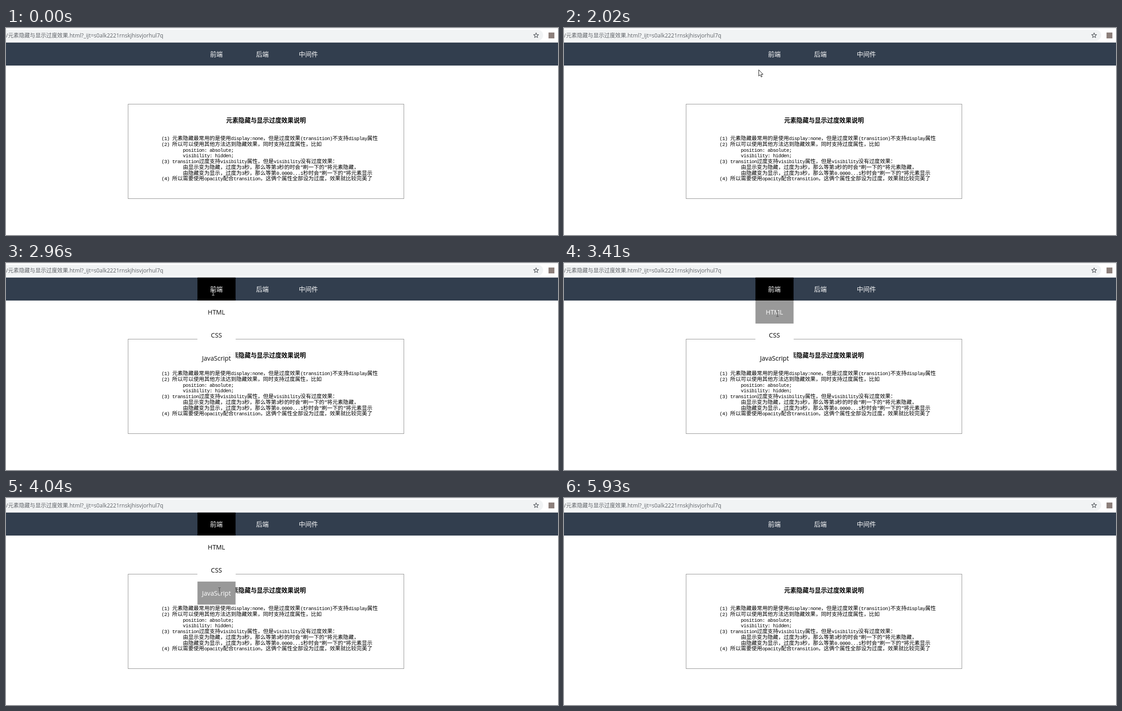
An HTML page for the animation above (6.86 s loop, 1223 by 458 pixels).

```html
<!DOCTYPE html>
<html lang="zh-CN">
<head>
<meta charset="utf-8">
<title>元素隐藏与显示过度效果</title>
<style>
  html, body { margin: 0; width: 100%; height: 100%; overflow: hidden; background: #fff; }
  svg { display: block; width: 1223px; height: 458px; }
  text { font: 14.1px "Open Sans", "Noto Sans CJK SC", "Noto Sans CJK", sans-serif; white-space: pre; }
  .mid, .mid text { text-anchor: middle; }
  #notes text { font: 11px "Liberation Mono", "Noto Sans CJK SC", "Noto Sans CJK", monospace; letter-spacing: -.68px; }
  #notes .zh { font: 11.84px "Noto Sans CJK SC", "Noto Sans CJK", sans-serif; letter-spacing: 0; }
</style>
</head>
<body>
<svg viewBox="0 0 1223 458">
  <rect width="1223" height="1" fill="#e4e6e9"/>
  <rect x="-20" y="4" width="1210" height="24" rx="12" fill="#f1f3f4"/>
  <text x="0" y="20.5" fill="#5f6368" style="font-size:12.1px">/元素隐藏与显示过度效果.html?_ijt=s0alk2221rnskjhisvjorhul7q</text>
  <path id="star" fill="none" stroke="#5f6368" stroke-width="1.3" stroke-linejoin="round"/>
  <rect x="1202" y="10" width="13" height="13" fill="#8d807b"/>

  <rect y="32.2" width="1223" height="50.9" fill="#323e4e"/>
  <rect id="tab" x="424.2" y="32.2" width="84.4" height="50.9"/>
  <g id="nav" class="mid" fill="#fff"></g>

  <rect x="270.5" y="168.5" width="611" height="209" fill="none" stroke="#909090"/>
  <text class="mid" x="576" y="208.5" style="font-size:13.6px;font-weight:700">元素隐藏与显示过度效果说明</text>
  <g id="notes"></g>

  <rect id="seam" x="424.2" y="168" width="84.4" height="1" fill="#fff"/>
  <g id="menu" class="mid"></g>

  <path id="arrow" d="M.5.5V14.3L3.6 11.4 5.9 16.4 8 15.4 5.8 10.6H10Z" fill="#fff" stroke="#111"/>
  <path id="beam" d="M-2.5-5.5H-.7L0-4.8.7-5.5H2.5M0-4.8V4.8M-2.5 5.5H-.7L0 4.8.7 5.5H2.5" fill="none"/>
</svg>
<script>
const LOOP = 6860, START = 440, BEAT = 5490 / 35;
const NAV_Y = 32.2, ROW = 50.9;
const OPEN = 11, TYPE = 12, CLOSE = 25, GONE = 35;
const $ = id => document.getElementById(id);

function add(parent, tag, attrs, text = "") {
  const el = document.createElementNS("http://www.w3.org/2000/svg", tag);
  for (const k in attrs) el.setAttribute(k, attrs[k]);
  el.textContent = text;
  parent.append(el);
  return el;
}

["前端", "后端", "中间件"].forEach((name, i) =>
  add($("nav"), "text", { x: 466 + i * 102, y: 63 }, name));

const notes = [
  "(1) 元素隐藏最常用的是使用display:none，但是过度效果(transition)不支持display属性",
  "(2) 所以可以使用其他方法达到隐藏效果，同时支持过度属性，比如",
  "        position: absolute;",
  "        visibility: hidden;",
  "(3) transition过度支持visibility属性，但是visibility没有过度效果：",
  "        由显示变为隐藏，过度为3秒，那么等第3秒的时会\"刷一下的\"将元素隐藏，",
  "        由隐藏变为显示，过度为3秒，那么等第0.0000...1秒时会\"刷一下的\"将元素显示",
  "(4) 所以需要使用opacity配合transition，这俩个属性全部设为过度，效果就比较完美了"
];
notes.forEach((line, i) => {
  const row = add($("notes"), "text", { x: 344.5, y: 248 + i * 12.75 });
  for (const run of line.match(/[ -~]+|[^ -~]+/g))
    add(row, "tspan", run[0] > "~" ? { class: "zh" } : {}, run);
});

const items = ["HTML", "CSS", "JavaScript"].map((name, i) => {
  const y = NAV_Y + ROW * (i + 1);
  return {
    y,
    bg: add($("menu"), "rect", { x: 424.2, y, width: 84.4, height: ROW }),
    label: add($("menu"), "text", { x: 466.2, y: y + 30.6 }, name)
  };
});

$("star").setAttribute("d", "M" + Array.from({ length: 10 }, (_, i) => {
  const r = i % 2 ? 2.5 : 5.8, a = i * Math.PI / 5;
  return (1174.5 + r * Math.sin(a)).toFixed(2) + " " + (16.5 - r * Math.cos(a)).toFixed(2);
}).join("L") + "Z");

// Where the pointer rests or turns: beat, x, y.
const stops = [
  [0, 1009, 383], [6, 424, 115], [10, 431, 92], [13, 457, 67], [16, 459, 66],
  [19, 473, 113], [23, 473, 204], [24, 473, 204], [28, 574, 193], [34, 1138, 452]
];

// Each leg slows down towards its end.
function pointer(beat) {
  const i = Math.max(1, stops.findIndex(s => s[0] >= beat));
  const [a, x0, y0] = stops[i - 1], [b, x1, y1] = stops[i];
  const k = Math.sin((beat - a) / (b - a) * Math.PI / 2);
  return [Math.round(x0 + (x1 - x0) * k), Math.round(y0 + (y1 - y0) * k)];
}

// One-second ease-out, from 0 to 1.
const ease = beats => 1 - (1 - Math.min(1, Math.max(0, beats * BEAT / 1000))) ** 2;
const show = (el, on) => el.setAttribute("visibility", on ? "visible" : "hidden");

function draw(now) {
  // The picture refreshes once per beat, allowing for 10 ms rounding.
  const beat = Math.floor((now % LOOP - START + 12) / BEAT);
  const [x, y] = pointer(beat);
  const hover = beat >= OPEN && beat < CLOSE;
  const typing = hover && beat >= TYPE;
  const alpha = ease(beat - OPEN) - ease(beat - CLOSE);

  show($("tab"), hover);
  $("menu").setAttribute("opacity", alpha);
  $("seam").setAttribute("opacity", 1 - (1 - alpha) ** 4);
  for (const { y: top, bg, label } of items) {
    const on = hover && y >= top && y < top + ROW;
    bg.setAttribute("fill", on ? "#999" : "#fff");
    label.setAttribute("fill", on ? "#fff" : "#000");
  }

  for (const id of ["arrow", "beam"]) $(id).setAttribute("transform", `translate(${x} ${y})`);
  $("beam").setAttribute("stroke", y < NAV_Y + ROW ? "#fff" : "#444");
  show($("arrow"), beat >= 0 && beat < GONE && !typing);
  show($("beam"), typing);
}

const begin = performance.now();
function loop() {
  draw(performance.now() - begin);
  requestAnimationFrame(loop);
}
loop();
</script>
</body>
</html>
```
